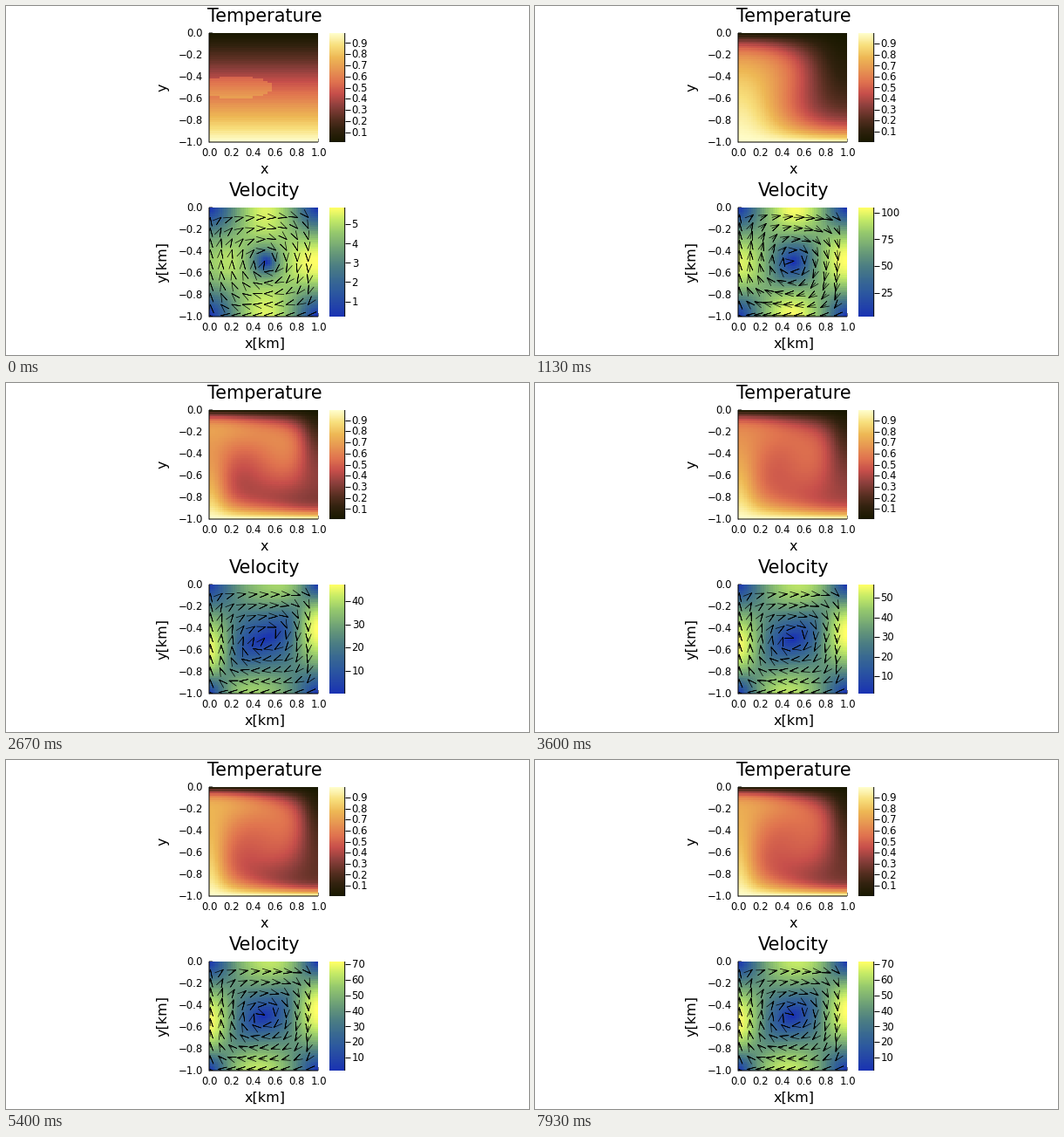
Animation of 600x400 px, one loop 8000 ms. Source, as a matplotlib script:

```python
import numpy as np
import matplotlib.pyplot as plt
from matplotlib.animation import FuncAnimation
from matplotlib.collections import LineCollection
from matplotlib.colors import LinearSegmentedColormap

# ---- thermal convection in a unit box (free slip, heated from below) ----
N, RA, FRAMES, STEPS = 50, 1e4, 120, 10
DT = 0.87 / (4 * N**2)
PI = np.pi
c = (np.arange(N) + 0.5) / N
m, n = np.arange(N), np.arange(1, N + 1)
cos_x, sin_x = np.cos(PI * np.outer(c, m)), np.sin(PI * np.outer(c, m))
cos_s, sin_s = np.cos(PI * np.outer(c, n)), np.sin(PI * np.outer(c, n))
inv_x, inv_s = np.linalg.inv(cos_x), np.linalg.inv(sin_s)
M, NN = np.meshgrid(m, n)
K2 = PI**2 * (M**2 + NN**2)
UP = RA * PI**2 * M**2 / K2**2
SIDE = RA * PI**2 * M * NN / K2**2
COOL = np.exp(-K2 * DT)
COL, ROW = np.meshgrid(np.arange(N), np.arange(N))
X, DEPTH = np.meshgrid(c, c)


def spectrum(theta):
    return inv_s @ theta @ inv_x.T


def velocity(theta):
    a = spectrum(theta)
    return cos_s @ (SIDE * a) @ sin_x.T, sin_s @ (UP * a) @ cos_x.T


def cubic(t):
    return (-t * (t - 1) * (t - 2) / 6, (t + 1) * (t - 1) * (t - 2) / 2,
            -(t + 1) * t * (t - 2) / 2, (t + 1) * t * (t - 1) / 6)


def sample(f, row, col, row_sign, col_sign):
    """Bicubic lookup with even or odd mirroring at the walls."""
    p = np.pad(f, 3, mode="symmetric")
    p[:3] *= row_sign
    p[-3:] *= row_sign
    p[:, :3] *= col_sign
    p[:, -3:] *= col_sign
    r0 = np.clip(np.floor(row).astype(int), -2, N)
    c0 = np.clip(np.floor(col).astype(int), -2, N)
    wr, wc = cubic(row - r0), cubic(col - c0)
    base = (r0 + 2) * (N + 6) + c0 + 2
    flat = p.ravel()
    return sum(wr[i] * sum(wc[j] * flat[base + i * (N + 6) + j]
                           for j in range(4)) for i in range(4))


def advance(theta):
    vx, vy = velocity(theta)
    h = DT * N
    row, col = ROW + vy * h / 2, COL - vx * h / 2
    mx, my = sample(vx, row, col, 1, -1), sample(vy, row, col, -1, 1)
    row, col = ROW + my * h, COL - mx * h
    theta = sample(theta, row, col, -1, 1) + (row - ROW) / N
    return sin_s @ (spectrum(theta) * COOL) @ cos_x.T


def simulate():
    blob = (((X - 0.25) / 0.34)**2 + ((DEPTH - 0.5) / 0.1)**2 < 1) * 1.0
    theta = blob * 5.87 / np.hypot(*velocity(blob)).max()
    states = []
    for k in range(FRAMES):
        states.append((theta + DEPTH, *velocity(theta)))
        for _ in range(STEPS if k else STEPS - 1):
            theta = advance(theta)
    return states


STATES = simulate()

# ---- drawing, in pixel coordinates with y downwards ----
HEAT = LinearSegmentedColormap.from_list("heat", [
    "#191900", "#32220F", "#5B3023", "#8F403D", "#C74F4B",
    "#E0734F", "#E79652", "#EEB855", "#F8DF7C", "#FFFECB"])
FLOW = LinearSegmentedColormap.from_list("flow", [
    "#1A33B3", "#2446A8", "#2D599F", "#396992", "#497B85",
    "#60927B", "#7BAE74", "#98CB6D", "#C4EA67", "#FFFF66"])
PX = 0.72
LEFT, SIZE = 233, 125
RIGHT = LEFT + SIZE
plt.rcParams["font.family"] = "DejaVu Sans"

fig = plt.figure(figsize=(6, 4), dpi=100, facecolor="white")
ax = fig.add_axes([0, 0, 1, 1])


def text(x, y, s, px, **kw):
    return ax.text(x, y, s, fontsize=px * PX, color="black", **kw)


def line(xs, ys, z=3):
    ax.plot(xs, ys, color="black", lw=PX, zorder=z, solid_capstyle="butt",
            snap=False)


def nice_ticks(lo, hi):
    """Largest step of 1, 2.5 or 5 times a power of ten giving four ticks."""
    for e in range(3, -4, -1):
        for q in (5, 2.5, 1):
            step = q * 10.0**e
            k = np.arange(np.ceil(lo / step), np.floor(hi / step) + 1)
            if len(k) >= 4:
                places = max(0, -e + (q == 2.5))
                return k * step, places
    return np.array([]), 0


class Panel:
    def __init__(self, top, cmap, title, xlabel, ylabel):
        self.top, self.bottom = top, top + SIZE
        bottom = self.bottom
        self.img = ax.imshow(np.zeros((N, N)), cmap=cmap, aspect="auto",
                             extent=(LEFT, RIGHT, bottom, top),
                             interpolation="nearest", zorder=2)
        ax.imshow(np.linspace(1, 0, 256)[:, None], cmap=cmap, aspect="auto",
                  extent=(371, 388.5, bottom, top), zorder=2)
        line([LEFT, LEFT], [top, bottom + 0.5])
        line([LEFT, RIGHT], [bottom, bottom])
        line([RIGHT, RIGHT], [bottom, bottom - 4], 1)
        line([LEFT, LEFT + 4], [top, top], 1)
        line([388.7, 388.7], [top, bottom])
        for i in range(6):
            v = i / 5
            text(LEFT + 0.7 + v * SIZE, top + 140.5, f"{v:.1f}",
                 11.6, ha="center", va="baseline")
            s = f"\u2212{v:.1f}" if i else "0.0"
            text(226, top + v * SIZE + 4.2, s, 11.6, ha="right", va="baseline")
        text(297, top - 13, title, 20.8, ha="center", va="baseline")
        text(296.7, top + 160.6, xlabel, 16, ha="center", va="baseline")
        text(184.8, top + SIZE / 2, ylabel, 16, ha="center", va="baseline",
             rotation=90, rotation_mode="anchor")
        self.marks = LineCollection([], colors="black", linewidths=PX, zorder=3)
        ax.add_collection(self.marks)
        self.labels = [text(396.6, 0, "", 11.6, va="baseline")
                       for _ in range(10)]

    def show(self, data):
        lo, hi = data.min(), data.max()
        self.img.set_data(data)
        self.img.set_clim(lo, hi)
        ticks, places = nice_ticks(lo, hi)
        ys = self.bottom - (ticks - lo) / (hi - lo) * SIZE
        self.marks.set_segments([[(388.7, y), (394.7, y)] for y in ys])
        for i, label in enumerate(self.labels):
            shown = i < len(ticks)
            label.set_text(f"{ticks[i]:.{places}f}" if shown else "")
            if shown:
                label.set_y(ys[i] + 4.2)


heat = Panel(31, HEAT, "Temperature", "x", "y")
flow = Panel(231, FLOW, "Velocity", "x[km]", "y[km]")

# every fifth cell, counted from the lower left corner
pick = (slice(4, None, 5), slice(0, None, 5))
TAIL = np.stack([LEFT + X[pick].ravel() * SIZE,
                 flow.top + DEPTH[pick].ravel() * SIZE], axis=1)
arrows = LineCollection([], colors="black", linewidths=0.5, zorder=2.5,
                        joinstyle="bevel")
ax.add_collection(arrows)
arrows.set_clip_path(plt.Rectangle((LEFT, flow.top), SIZE, SIZE,
                                   transform=ax.transData))
ax.set_xlim(0, 600)
ax.set_ylim(400, 0)
ax.axis("off")


def arrow_paths(vx, vy):
    d = np.stack([vx[pick].ravel(), -vy[pick].ravel()], axis=1)
    unit = d / np.maximum(np.hypot(d[:, :1], d[:, 1:]), 1e-9)
    side = np.stack([-unit[:, 1], unit[:, 0]], axis=1)
    tip = TAIL + d * 1e-3 * SIZE
    back = tip - 10 * unit
    return np.stack([TAIL, tip, back + 3.2 * side, tip, back - 3.2 * side],
                    axis=1)


def update(k):
    temp, vx, vy = STATES[k]
    heat.show(temp)
    flow.show(np.hypot(vx, vy))
    arrows.set_segments(arrow_paths(vx, vy))
    return []


anim = FuncAnimation(fig, update, frames=FRAMES, interval=8000 / FRAMES,
                     init_func=lambda: update(0), repeat=True, repeat_delay=0)
plt.show()
```
